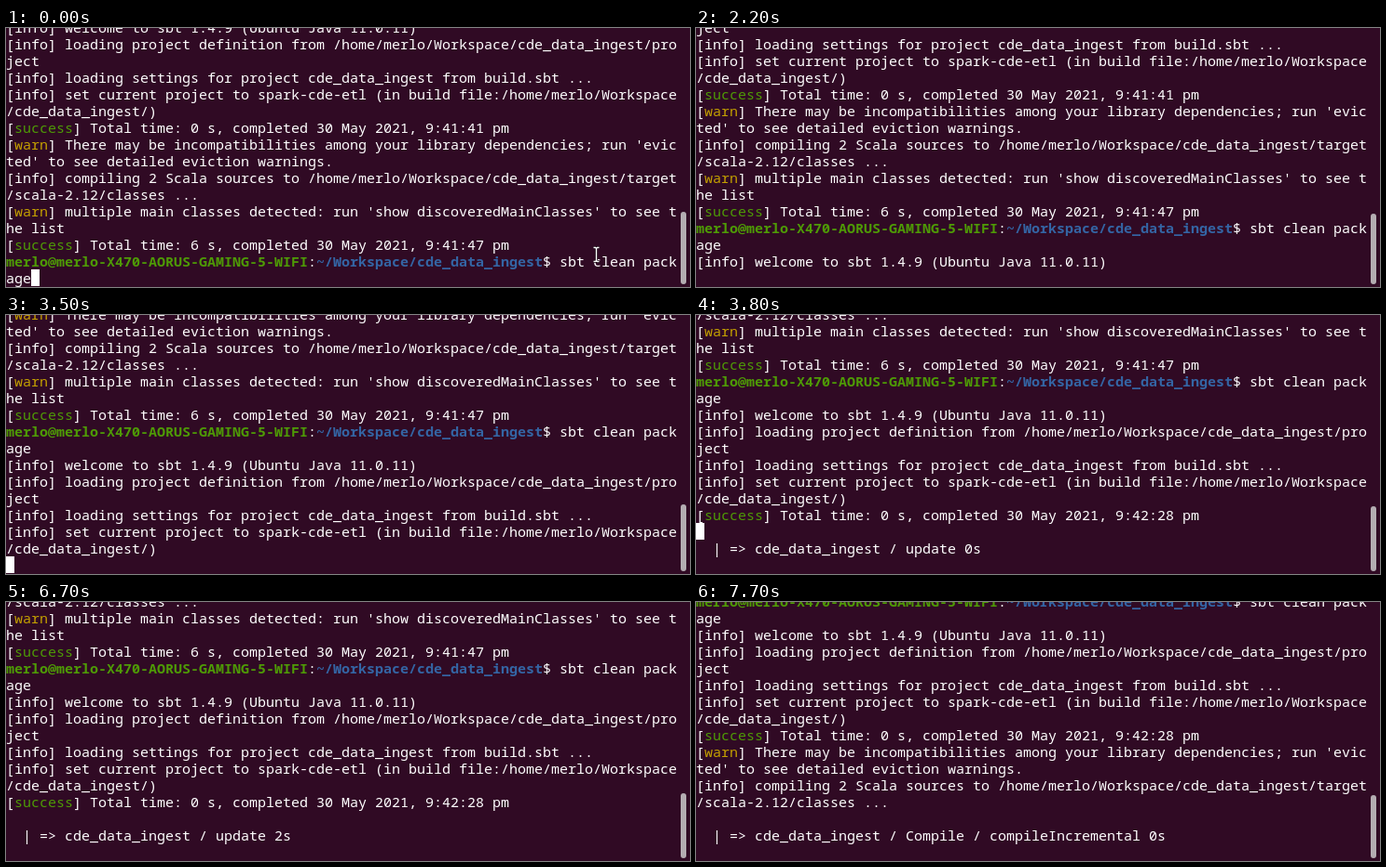
These frames come from a looping animation (734x279 px, 8 s). An HTML page with a canvas:

```html
<!DOCTYPE html>
<html lang="en">
<head>
<meta charset="utf-8">
<title>Terminal build</title>
<style>
  html, body { margin: 0; width: 100%; height: 100%; overflow: hidden; background: #300a24; }
  canvas { display: block; }
</style>
</head>
<body>
<canvas id="stage" width="734" height="279"></canvas>
<script>
const ctx = document.getElementById('stage').getContext('2d');
const LOOP = 8000, COLS = 80, CELL_W = 9, CELL_H = 18, TOP = 8, BASELINE = 15;
const FONT = '15px "Noto Sans Mono", "DejaVu Sans Mono", monospace';
const BACK = '#300a24', WHITE = '#ffffff', GREEN = '#4e9a06', YELLOW = '#c4a000', BLUE = '#3465a4';
const TAG_COLORS = { info: WHITE, success: GREEN, warn: YELLOW };
const USER = 'merlo';
const PROJECT = `/home/${USER}/Workspace/cde_data_ingest`;

const run = (text, color = WHITE, bold = false) => ({ text, color, bold });
const log = (tag, text) => [run('['), run(tag, TAG_COLORS[tag]), run('] ' + text)];

// Breaks a line of coloured runs into terminal rows.
function wrap(line) {
  const rows = [[]];
  let col = 0;
  for (const { text, color, bold } of line) {
    for (let rest = text; rest;) {
      if (col === COLS) { rows.push([]); col = 0; }
      const part = rest.slice(0, COLS - col);
      rows[rows.length - 1].push({ text: part, color, bold, col });
      col += part.length;
      rest = rest.slice(part.length);
    }
  }
  return rows;
}

const total = (seconds, clock) =>
  log('success', `Total time: ${seconds} s, completed 30 May 2021, ${clock} pm`);

const build = clock => [
  log('info', 'welcome to sbt 1.4.9 (Ubuntu Java 11.0.11)'),
  log('info', `loading project definition from ${PROJECT}/project`),
  log('info', 'loading settings for project cde_data_ingest from build.sbt ...'),
  log('info', `set current project to spark-cde-etl (in build file:${PROJECT}/)`),
  total(0, clock),
  log('warn', "There may be incompatibilities among your library dependencies; run 'evicted' to see detailed eviction warnings."),
  log('info', `compiling 2 Scala sources to ${PROJECT}/target/scala-2.12/classes ...`)
];

const rows = [
  ...build('9:41:41'),
  log('warn', "multiple main classes detected: run 'show discoveredMainClasses' to see the list"),
  total(6, '9:41:47'),
  [
    run(`${USER}@${USER}-X470-AORUS-GAMING-5-WIFI`, GREEN, true), run(':'),
    run('~/Workspace/cde_data_ingest', BLUE, true), run('$ sbt clean package')
  ],
  ...build('9:42:28')
].flatMap(wrap);

const task = name => '  | => cde_data_ingest / ' + name;

// [start ms, rows printed, screen row after the last one, caret, scrollbar top, task]
const steps = [
  [0, 16, 15, true, 198],
  [500, 16, 15, false, 198],
  [1100, 16, 15, true, 198],
  [1400, 16, 14, true, 200],
  [1900, 16, 14, false, 200],
  [2200, 17, 14, false, 200],
  [2300, 17, 14, true, 200],
  [2800, 19, 14, true, 202],
  [2900, 19, 14, false, 202],
  [3300, 20, 14, false, 203],
  [3400, 22, 14, false, 204],
  [3500, 22, 14, true, 204],
  [3600, 23, 14, true, 205],
  [3800, 23, 12, true, 206, 'update 0s'],
  [4100, 23, 12, false, 206, 'update 0s'],
  [4900, 23, 12, true, 206, 'update 0s'],
  [5300, 23, 12, false, 206, 'update 0s'],
  [5700, 23, 12, false, 206, 'update 1s'],
  [5900, 23, 12, true, 206, 'update 1s'],
  [6700, 23, 12, false, 206, 'update 2s'],
  [7000, 25, 12, false, 207, 'update 2s'],
  [7300, 25, 12, true, 207, 'update 2s'],
  [7400, 27, 12, true, 208, 'update 2s'],
  [7500, 27, 12, true, 208, 'Compile / compileIncremental 0s'],
  [7700, 27, 12, false, 208, 'Compile / compileIncremental 0s']
];

function drawRun({ text, color, bold, col = 0 }, row) {
  ctx.font = (bold ? 'bold ' : '') + FONT;
  ctx.fillStyle = color;
  ctx.fillText(text, col * CELL_W, TOP + row * CELL_H + BASELINE);
}

function drawPointer() {
  const beam = new Path2D('M630.5 236.5 H632.5 L633.5 237.5 L634.5 236.5 H636.5 M633.5 237.5 V250 M630.5 251.5 H632.5 L633.5 250.5 L634.5 251.5 H636.5');
  for (const [width, color] of [[3, '#14040f'], [1.4, WHITE]]) {
    ctx.lineWidth = width;
    ctx.strokeStyle = color;
    ctx.stroke(beam);
  }
}

function drawScrollbar(top) {
  ctx.fillStyle = '#b4adb2';
  ctx.beginPath();
  ctx.roundRect(724, top, 6, 276 - top, 3);
  ctx.fill();
}

function draw(time) {
  const [, printed, end, caret, barTop, status] = steps.findLast(step => step[0] <= time);
  ctx.fillStyle = BACK;
  ctx.fillRect(0, 0, 734, 279);
  for (let i = Math.max(0, printed - end - 1); i < printed; i++) {
    rows[i].forEach(part => drawRun(part, i - printed + end));
  }
  if (status) drawRun(run(task(status)), end + 1);
  if (caret) {
    const typing = end > 14;
    ctx.fillStyle = WHITE;
    ctx.fillRect(typing ? 3 * CELL_W : 0, TOP + (typing ? 14 : end) * CELL_H, CELL_W, CELL_H);
  }
  drawScrollbar(barTop);
  if (time < 1100) drawPointer();
}

const start = performance.now();
function tick() {
  draw((performance.now() - start) % LOOP);
  requestAnimationFrame(tick);
}
tick();
</script>
</body>
</html>
```
